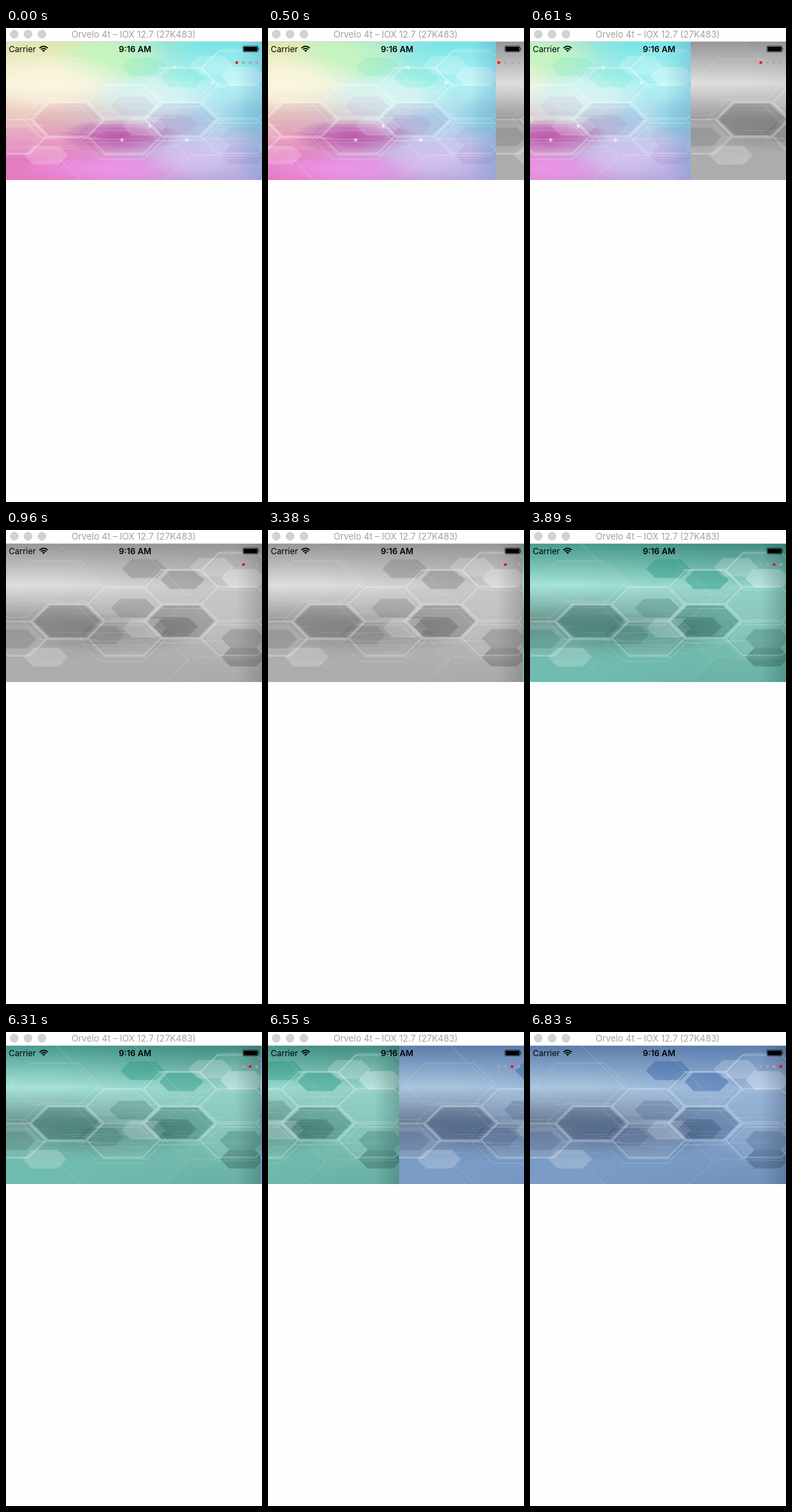
Animation of 371x686 px, one loop 8 s. Source, as an HTML page:

```html
<!DOCTYPE html>
<html lang="en">
<head>
<meta charset="utf-8">
<style>
html, body { margin: 0; width: 100%; height: 100%; overflow: hidden; background: #fefefe; }
svg { display: block; width: 371px; height: 686px; }
text { font-family: Inter, Roboto, sans-serif; }
</style>
</head>
<body>
<svg viewBox="0 0 371 686">
  <defs>
    <clipPath id="banner"><rect y="20" width="371" height="200"/></clipPath>
    <linearGradient id="fade">
      <stop offset=".22" stop-color="#fff" stop-opacity="0"/>
      <stop offset=".75" stop-color="#fff"/>
    </linearGradient>
    <mask id="rightSide"><rect y="20" width="371" height="200" fill="url(#fade)"/></mask>
  </defs>
  <rect width="371" height="686" fill="#fefefe"/>
  <g clip-path="url(#banner)"><g id="strip"></g></g>
  <rect y="19" width="371" height="1" fill="#d9d9d9"/>
  <g id="buttons" fill="#d2d2d2" stroke="#c6c6c6" stroke-width=".8"></g>
  <text x="185" y="14" text-anchor="middle" font-size="12.9" fill="#a2a2a2">Orvelo 4t – lOX 12.7 (27K483)</text>
  <text x="4" y="34.5" font-size="12">Carrier</text>
  <g fill="none" stroke="#000" stroke-width="1.7">
    <path d="M48.5 29.2Q54.5 23.6 60.5 29.2M50.7 31.4Q54.5 28 58.3 31.4"/>
    <path d="M52.4 32.6Q54.5 30.9 56.6 32.6L54.5 34.8Z" fill="#000" stroke="none"/>
  </g>
  <text x="187" y="34.5" text-anchor="middle" font-size="12" font-weight="600">9:16 AM</text>
  <rect x="343.4" y="25.9" width="22" height="8.8" rx="1.5" fill="none" stroke="#000" stroke-opacity=".7" stroke-width=".8"/>
  <rect x="344.4" y="26.9" width="20" height="6.8" rx=".6"/>
  <path d="M366.3 28.6Q368 30.3 366.3 32Z"/>
  <g id="dots"></g>
</svg>
<script>
const NS = 'http://www.w3.org/2000/svg';
const WIDTH = 371, LOOP = 8000, SLIDE = 545;
const STARTS = [383, 3353, 6283];
const defs = document.querySelector('defs');
const strip = document.getElementById('strip');

// left and right: backdrop colours downwards; depth: strength of dark cells
const THEMES = [
  { left: ['#e2e5b0', '#f7f4d8', '#eac4be', '#e47cc0'], right: ['#7ae4e6', '#a4f0f1', '#bda9e0'],
    accent: '#2fe098', shade: '#a04aa8', edge: '#4a8fc0', depth: .35, vivid: true },
  { left: ['#969696', '#dedede', '#9c9c9c', '#adadad'], right: ['#979797', '#c4c4c4', '#aaaaaa'],
    accent: '#777', shade: '#555', edge: '#555', depth: 1 },
  { left: ['#469b8d', '#a6e2d7', '#6b9891', '#71bcb0'], right: ['#438f83', '#8bcec3', '#6ab1a5'],
    accent: '#179079', shade: '#22574f', edge: '#1b4c47', depth: 1 },
  { left: ['#5b7dab', '#abc5df', '#6c7d96', '#7a9cc7'], right: ['#5e80ae', '#92b0d5', '#7192bc'],
    accent: '#23569c', shade: '#30466a', edge: '#2d405c', depth: 1 }
];
// small cells: centre and tone (below zero is dark)
const ACCENTS = [
  [200, 56, -.3], [256, 72, -.32], [298, 54, .2], [344, 70, .32], [184, 113, -.18], [201, 142, .18],
  [246, 140, -.25], [344, 157, -.2], [344, 184, -.3], [58, 184, .2], [12, 158, -.16], [140, 152, -.15]
];
const GLOWS = [
  [150, 40, 90, 42, '#c4f8bd'], [70, 80, 110, 45, '#fbf6e0'], [215, 100, 100, 34, '#dcf6f4'],
  [165, 157, 90, 26, '#b23c9e'], [150, 203, 140, 24, '#f094ec'], [275, 185, 80, 36, '#d9c5f2'],
  [350, 130, 45, 34, '#7cc8dc']
];
const SPARKS = [[168, 162], [262, 162], [244, 57], [208, 142], [299, 79]];

function add(parent, tag, attrs) {
  const node = document.createElementNS(NS, tag);
  for (const key in attrs) node.setAttribute(key, attrs[key]);
  parent.append(node);
  return node;
}

let serial = 0;
function gradient(tag, attrs, stops) {
  const id = 'g' + serial++;
  const node = add(defs, tag, { id, ...attrs });
  for (const [offset, color, opacity = 1] of stops)
    add(node, 'stop', { offset, 'stop-color': color, 'stop-opacity': opacity });
  return `url(#${id})`;
}

function seeded(seed) {
  return () => (seed = seed * 16807 % 2147483647) / 2147483647;
}

function hexPath(x, y, rx, h) {
  const flat = rx - h;
  return `M${x - rx} ${y}L${x - flat} ${y - h}H${x + flat}L${x + rx} ${y}L${x + flat} ${y + h}H${x - flat}Z`;
}

function honeycomb() {
  const cells = [];
  for (let col = 0; col < 5; col++)
    for (let row = 0; row < 3; row++)
      cells.push([7 + col * 82.3, 58 + row * 49.5 + col % 2 * 24.7]);
  return cells;
}
// the comb thins out towards the upper left
const COMB = honeycomb().filter(([x, y]) => y > 135 - x / 4 && y < 175);

function cover(parent, fill, extra = {}) {
  add(parent, 'rect', { y: 20, width: WIDTH, height: 200, fill, ...extra });
}

function backdrop(parent, colors, offsets, extra) {
  cover(parent, gradient('linearGradient', { x2: 0, y2: 1 }, colors.map((c, i) => [offsets[i], c])), extra);
}

function glow(parent, x, y, rx, ry, color, strength = .85) {
  const fill = gradient('radialGradient', {}, [[0, color, strength], [.45, color, strength * .7], [1, color, 0]]);
  add(parent, 'ellipse', { cx: x, cy: y, rx, ry, fill });
}

function cell(parent, theme, x, y, rx, h, tone) {
  const dark = y < 90 ? theme.accent : theme.shade;
  add(parent, 'path', {
    d: hexPath(x, y, rx, h),
    fill: tone < 0 ? dark : '#fff',
    opacity: tone < 0 ? -tone * theme.depth * 1.2 : tone
  });
}

function fineLines(parent, opacity) {
  const rnd = seeded(77);
  const group = add(parent, 'g', { fill: 'none', stroke: '#fff', 'stroke-width': .8, opacity });
  add(group, 'path', { d: hexPath(73, 75, 65, 30) + hexPath(168, 160, 62, 30) });
  add(group, 'path', { d: 'M75 20L137 82M75 187L108 220M188 20L265 97L236 126M230 220L265 188L235 158' });
  for (const [x, y] of COMB)
    add(group, 'path', { d: hexPath(x + rnd() * 16 - 8, y + rnd() * 6 - 3, 60, 28) });
}

function streaks(parent, strength) {
  const rnd = seeded(4217);
  for (let i = 0; i < 60; i++) {
    const width = 15 + rnd() * 95;
    const x = rnd() * WIDTH - width / 2;
    const y = Math.round(65 + (rnd() + rnd()) * 70);
    add(parent, 'rect', { x, y, width, height: .7, fill: '#fff', opacity: strength * (.4 + rnd()) });
  }
}

function drawPage(theme, index) {
  const page = add(strip, 'g', { transform: `translate(${index * WIDTH})` });
  const art = add(page, 'g', { 'clip-path': 'url(#banner)' });
  backdrop(art, theme.left, [0, .3, .55, .85]);
  backdrop(art, theme.right, [0, .3, 1], { mask: 'url(#rightSide)' });
  if (theme.vivid) GLOWS.forEach(g => glow(art, ...g));
  else glow(art, 165, 150, 130, 32, theme.shade, .28);

  for (const [x, y] of COMB) {
    const middle = Math.abs(y - 132) < 5;
    cell(art, theme, x, y, 48, 23, middle ? -.22 : .07);
  }
  for (const [x, y, tone] of ACCENTS) cell(art, theme, x, y, 32, 13.5, tone);

  add(art, 'path', {
    d: COMB.map(([x, y]) => hexPath(x, y, 52.5, 24.7)).join(''),
    fill: 'none', stroke: '#fff', 'stroke-width': 2.8, opacity: .24
  });
  fineLines(art, theme.vivid ? .36 : .25);
  streaks(art, theme.vivid ? .22 : .12);
  if (theme.vivid) {
    for (const [x, y] of SPARKS)
      add(art, 'path', { d: `M${x - 3} ${y}h6M${x} ${y - 3}v6`, stroke: '#fff' });
  }
  cover(art, gradient('linearGradient', {}, [[.9, theme.edge, 0], [1, theme.edge, .3]]));
  return page;
}

const circles = (parent, count, x, gap, cy, r) => Array.from({ length: count },
  (_, i) => add(document.getElementById(parent), 'circle', { cx: x + i * gap, cy, r }));

circles('buttons', 3, 12, 20, 9, 5.7);
const pages = THEMES.map(drawPage);
const dots = circles('dots', THEMES.length, 334.5, 9.6, 50, 2.1);

const ease = p => (1 - Math.cos(Math.PI * Math.min(1, Math.max(0, p)))) / 2;

function render(time) {
  const position = STARTS.reduce((sum, start) => sum + ease((time - start) / SLIDE), 0);
  strip.setAttribute('transform', `translate(${-Math.round(position * WIDTH)})`);
  pages.forEach((page, i) => page.setAttribute('display', Math.abs(i - position) < 1 ? 'inline' : 'none'));
  const current = Math.round(position);
  dots.forEach((dot, i) => dot.setAttribute('fill', i === current ? '#f00' : '#a8a8a8'));
}

const began = performance.now();
function tick() {
  render((performance.now() - began) % LOOP);
  requestAnimationFrame(tick);
}
tick();
</script>
</body>
</html>
```
